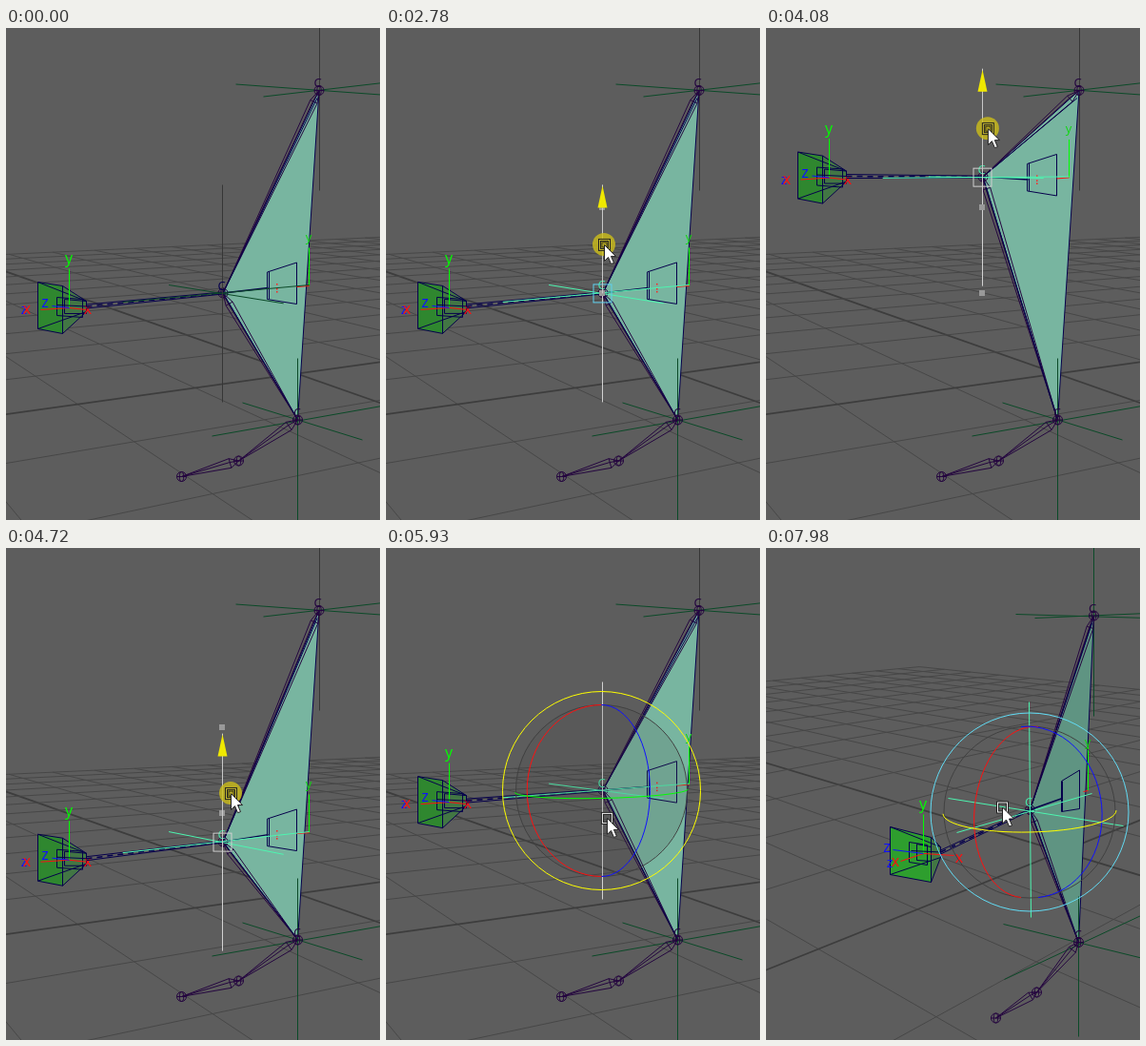
An HTML page with a canvas for the animation above (8 s loop, 393 by 516 pixels).

```html
<!DOCTYPE html>
<html lang="en">
<head>
<meta charset="utf-8">
<title>Rig viewport</title>
<style>
html, body { margin: 0; width: 100%; height: 100%; overflow: hidden; background: #5d5d5d; }
canvas { display: block; }
</style>
</head>
<body>
<canvas id="view" width="393" height="516"></canvas>
<script>
const g = document.getElementById('view').getContext('2d');
const LOOP = 8000, TAU = Math.PI * 2;
const NAVY = '#06004c', PURPLE = '#24053f', GREEN = '#0b4a28', MINT = '#4df5b0';

// Timeline keys: [ms, value]
const liftKeys = [[2780, 278], [3290, 234], [3570, 182], [3880, 156], [4080, 156], [4400, 205],
  [4720, 308], [4850, 323], [5000, 334], [5300, 300], [5700, 254]];
const yawKeys = [[6150, 34.5], [6520, 24], [6850, 46], [7130, 25.7], [7360, 33]];
const mouseX = [[140, 292], [450, 222], [600, 222], [1010, 217], [1190, 217], [1380, 229], [3290, 229],
  [4720, 236], [5800, 232], [5930, 232], [6120, 218]];
const mouseY = [[140, 429], [450, 250], [600, 250], [1010, 208], [1190, 208], [1380, 197],
  [1800, 197], [2350, 227]];
const mouseY2 = [[5750, 203], [5930, 283], [6120, 260]];

function track(t, keys) {
  if (t <= keys[0][0]) return keys[0][1];
  for (let i = 1; i < keys.length; i++) {
    const [t0, v0] = keys[i - 1], [t1, v1] = keys[i];
    if (t < t1) return v0 + (v1 - v0) * (t - t0) / (t1 - t0);
  }
  return keys[keys.length - 1][1];
}

let p = 0; // camera orbit progress
const mix = (a, b) => a + (b - a) * p;
const pt = (x, y, x2, y2) => [mix(x, x2), mix(y, y2)];
const add = (a, b, k = 1) => [a[0] + b[0] * k, a[1] + b[1] * k];
const blend = (a, b) => `rgb(${a.map((v, i) => Math.round(mix(v, b[i])))})`;

function path(points, close) {
  g.beginPath();
  points.forEach(q => g.lineTo(q[0] + .5, q[1] + .5));
  if (close) g.closePath();
}
function line(color, width, ...points) {
  path(points);
  g.strokeStyle = color; g.lineWidth = width; g.stroke();
}
function shape(fill, stroke, ...points) {
  path(points, true);
  if (fill) { g.fillStyle = fill; g.fill(); }
  if (stroke) { g.strokeStyle = stroke; g.lineWidth = 1; g.stroke(); }
}
function box(c, r, color, width = 1) {
  g.strokeStyle = color; g.lineWidth = width;
  g.strokeRect(c[0] - r + .5, c[1] - r + .5, r * 2, r * 2);
}
function arc(c, rx, ry, from, to, color, tilt = 0) {
  g.beginPath();
  g.ellipse(c[0] + .5, c[1] + .5, rx, ry, tilt, from, to);
  g.strokeStyle = color; g.lineWidth = 1; g.stroke();
}
function label(s, c, color, size = 16) {
  g.font = size + 'px "Open Sans", "Noto Sans", sans-serif';
  g.textAlign = 'center'; g.textBaseline = 'alphabetic';
  g.fillStyle = color;
  g.fillText(s, c[0], c[1]);
}
function bone(a, b, w) {
  const dx = b[0] - a[0], dy = b[1] - a[1], len = Math.hypot(dx, dy);
  const m = add(a, [dx / len, dy / len], Math.min(13, len * .15));
  const n = [-dy / len * w, dx / len * w];
  for (const k of [-1, .2, 1]) line(PURPLE, 1, a, add(m, n, k), b);
  line(PURPLE, 1, add(m, n), add(m, n, -1));
}
function joint(c) {
  arc(c, 5, 5, 0, TAU, PURPLE);
  arc(c, 2.2, 5, 0, TAU, PURPLE);
  line(PURPLE, 1, add(c, [-5, 0]), add(c, [5, 0]));
}

function grid() {
  const o = pt(305, 362, 310, 318), va = pt(1787, 155, 990, 46), vb = pt(-286, 155, -597, 46);
  const a = mix(.0672, .091), b = mix(.122, .116);
  const at = (u, v) => {
    const w = 1 + u * a + v * b;
    return [0, 1].map(i => (o[i] + u * a * va[i] + v * b * vb[i]) / w);
  };
  for (let k = -12; k <= 12; k++) {
    const color = k ? '#474747' : '#3d3d3d', width = k ? 1 : 1.7;
    const u0 = Math.max(-12, (-.95 - k * b) / a), v0 = Math.max(-12, (-.95 - k * a) / b);
    if (u0 < 12) line(color, width, at(u0, k), at(12, k));
    if (v0 < 12) line(color, width, at(k, v0), at(k, 12));
  }
}

function camera(c) {
  const q = (x, y, x2, y2) => add(c, pt(x, y, x2, y2));
  const tl = q(-33, -27, -35, -28), tr = q(-7, -23, 8, -17), br = q(-7, 27, 8, 30), bl = q(-33, 22, -35, 22);
  const up = q(18, -7, 18, -7), dn = q(18, 4, 18, 4);
  shape('#427644', NAVY, tr, up, dn, br);
  shape(blend([47, 135, 47], [46, 158, 46]), NAVY, tl, tr, br, bl);
  line(NAVY, 1, tl, up);
  line(NAVY, 1, bl, dn);
  const i1 = q(-13, -11, -15, -12), i2 = q(14, -9, 4, -9), i3 = q(14, 10, 4, 12), i4 = q(-13, 8, -15, 9);
  shape(null, NAVY, i1, i2, i3, i4);
  shape(null, NAVY, add(i1, [8, 2]), add(i2, [4, 2]), add(i3, [4, -4]), add(i4, [8, -2]));
  line('#00ff00', 1, c, add(c, [0, -41]));
  line('#ff1010', 1, q(-30, 2, -24, 8), c, q(18, 2, 32, 2));
  line('#1010ff', 1, c, q(-18, -2, -32, -4));
  label('y', q(0, -46, 0, -46), '#00ff00');
  label('z', q(-47, 7, -35, 15), '#1010ff', 14);
  label('x', q(-44, 7, -29, 14), '#ff1010');
  label('z', q(-25, 0, -38, -1), '#1010ff');
  label('x', q(20, 7, 38, 10), '#ff1010');
}

function moveTool(c, t) {
  if (t > 2780) {
    g.fillStyle = '#999';
    for (const y of [188, 278]) g.fillRect(224, y - 3, 6, 6);
  }
  box(c, 9.5, t < 4000 ? '#5fd0ee' : '#d0d0d0');
  line('#c8c8c8', 1, c, add(c, [0, -90]));
  shape('#f0e800', null, add(c, [0, -113]), add(c, [-5, -90]), add(c, [5, -90]));
}

function rotateTool(c, yaw, active, held) {
  const s = Math.sin(yaw), k = Math.cos(yaw), q = Math.PI / 2;
  if (!held) {
    g.fillStyle = `rgba(70,70,70,${.16 * (1 - p)})`;
    g.beginPath(); g.arc(c[0], c[1], 90, 0, TAU); g.fill();
  }
  arc(c, 90, 90, 0, TAU, '#414141');
  const tilt = mix(0, .1);
  arc(c, mix(95 * k, 58), 90, q, 3 * q, '#ff1010', tilt);
  arc(c, mix(90 * s, 76), 90, -q, q, '#1010ff', -tilt);
  arc(c, 91, mix(8, 21), 0, Math.PI, active ? '#ffff00' : '#00ff00', -.02);
  arc(c, 104, 104, 0, TAU, active ? '#62dcf5' : '#ffff00');
}

function pointer(c, tool, held) {
  if (held) {
    g.fillStyle = 'rgba(205,190,25,.8)';
    g.beginPath(); g.arc(c[0], c[1], 12, 0, TAU); g.fill();
  }
  if (tool) {
    box(c, 5, '#222', 3);
    box(c, 5, held ? '#c8bb30' : '#f4f4f4');
    if (held) box(c, 2.5, '#332f10');
  }
  const arrow = [[0, 0], [0, 17], [4, 13], [7, 20], [10, 19], [7, 12], [12, 12]];
  shape('#fff', '#222', ...arrow.map(d => add(c, d)));
}

function draw(t) {
  p = Math.min(1, Math.max(0, (t - 7690) / 285));
  const lift = track(t, liftKeys), drop = lift - 278;
  const yaw = track(t, yawKeys), turn = (yaw - 34.5) * Math.PI / 180;
  const selected = t > 1560, moving = t > 1900 && t < 5830, rotating = t >= 5830;
  const held = t > 2500 && t < 5780 || t > 6130 && t < 7450;

  g.fillStyle = '#5d5d5d';
  g.fillRect(0, 0, 393, 516);
  grid();

  const top = pt(328.5, 65, 344, 70.5), root = pt(306, 410.5, 328, 413), ctl = pt(227.5, lift - .5, 277, 274);
  const mid = pt(244, 453.5, 284, 465.5), end = pt(184, 470, 241, 492.5);
  const cam = pt(66, lift + 15 + drop * .12, 165, 320);
  const tilt = -.068 * drop;

  // Fixed crosshairs
  line(blend([54, 54, 54], [11, 74, 40]), 1, pt(329, -5, 344, -5), pt(329, 170, 344, 176));
  line(GREEN, 1, pt(241, 58.5, 262, 69), pt(400, 70, 400, 73));
  line(GREEN, 1, pt(270, 71.5, 282, 73), pt(400, 56.5, 400, 68));
  line(GREEN, 1, pt(248, 392.5, 249, 394), pt(374, 431.5, 400, 431));
  line(GREEN, 1, pt(216, 427.5, 250, 452), pt(400, 395, 400, 382));

  // Mesh
  shape(blend([120, 181, 160], [95, 148, 130]), NAVY, top, ctl, root);
  line(GREEN, 1, pt(306, 346, 328, 365), pt(306, 520, 328, 512));

  // Small panel and its axes
  const side = (x, y, x2, y2) => pt(x, lift + y + tilt, x2, y2);
  shape(null, NAVY, side(274, -22.5, 310, 244), side(305, -32.5, 329, 232.5),
    side(305, 11, 329, 273), side(274, 6, 310, 276));
  line(NAVY, 1, side(276, -23, 311, 244), side(276, 6, 311, 276));
  const tip = side(318, -8, 338, 254);
  line('#00ff00', 1, tip, add(tip, [0, mix(-40, -46)]));
  label('y', add(tip, [0, -46]), '#10d810', 13);
  line('#ff1010', 1, add(tip, [mix(-13, -5), 1]), tip);
  g.fillStyle = `rgba(255,32,32,${1 - p})`;
  for (const y of [-10, -5, -2]) {
    const d = side(284, y, 320, 257 + y);
    g.fillRect(d[0], d[1], 1.5, 1.5);
  }

  // Bones
  const girth = mix(4, 3.5);
  bone(top, ctl, girth);
  bone(ctl, root, girth);
  line(NAVY, 1, add(top, [-2, 8]), ctl, add(root, [-1, -2]));
  bone(root, mid, girth + 1);
  bone(mid, end, girth + 1);
  [top, ctl, root, mid, end].forEach(joint);

  camera(cam);
  const wrist = add(cam, [18, -1.5]);
  line(NAVY, 1, add(cam, [-13, -3]), wrist);
  line(NAVY, 1, add(wrist, [0, -2]), add(ctl, [0, -1]));
  line(NAVY, 1, add(wrist, [0, 2]), add(ctl, [0, 1]));
  g.setLineDash([6, 5]);
  line(NAVY, 1.5, wrist, ctl);
  g.setLineDash([]);
  line(NAVY, 1.4, ctl, side(275, -6, 311, 262));

  // Control crosshair, turned by the yaw
  const off = -9 + tilt, s = Math.sin(turn), k = Math.cos(turn);
  const e1 = [-60 * k - 98 * s, off * (k - s)], e2 = [98 * k - 60 * s, off * (k + s)];
  const tint = selected ? MINT : GREEN;
  line(tint, 1, pt(227 + e1[0] * .94, lift + e1[1], 191, 262), pt(227 - e1[0] * 1.07, lift - e1[1] * 1.15, 375, 291));
  line(tint, 1, pt(227 + e2[0] * .93, lift + e2[1], 342, 257), pt(227 - e2[0] * 1.07, lift - e2[1], 200, 298));
  const post = !selected ? '#363636' : blend([210, 210, 210], [77, 245, 176]);
  line(post, 1, pt(227, lift - 114, 276, 161), pt(227, lift + 114, 278, 387));

  label('C', add(top, [-1, -3]), PURPLE, 13);
  label('C', add(ctl, [-1, -3]), selected ? '#48e6a8' : NAVY, 13);
  label('C', add(root, [0, -3]), PURPLE, 12);

  if (moving) moveTool(pt(227, lift, 277, 274), t);
  if (rotating) rotateTool(pt(226, lift, 276.5, 276.5), yaw * Math.PI / 180, t > 6130, held);

  if (t >= 140) {
    const x = track(t, mouseX) + (yaw - 34.5) * 1.57;
    const y = t < 2780 ? track(t, mouseY) : t < 5750 ? lift - 51 : track(t, mouseY2);
    pointer(pt(x, y, 248, 271.5), moving || rotating, held);
  }
}

function tick(now) {
  draw(now % LOOP);
  requestAnimationFrame(tick);
}
draw(0);
requestAnimationFrame(tick);
</script>
</body>
</html>
```
